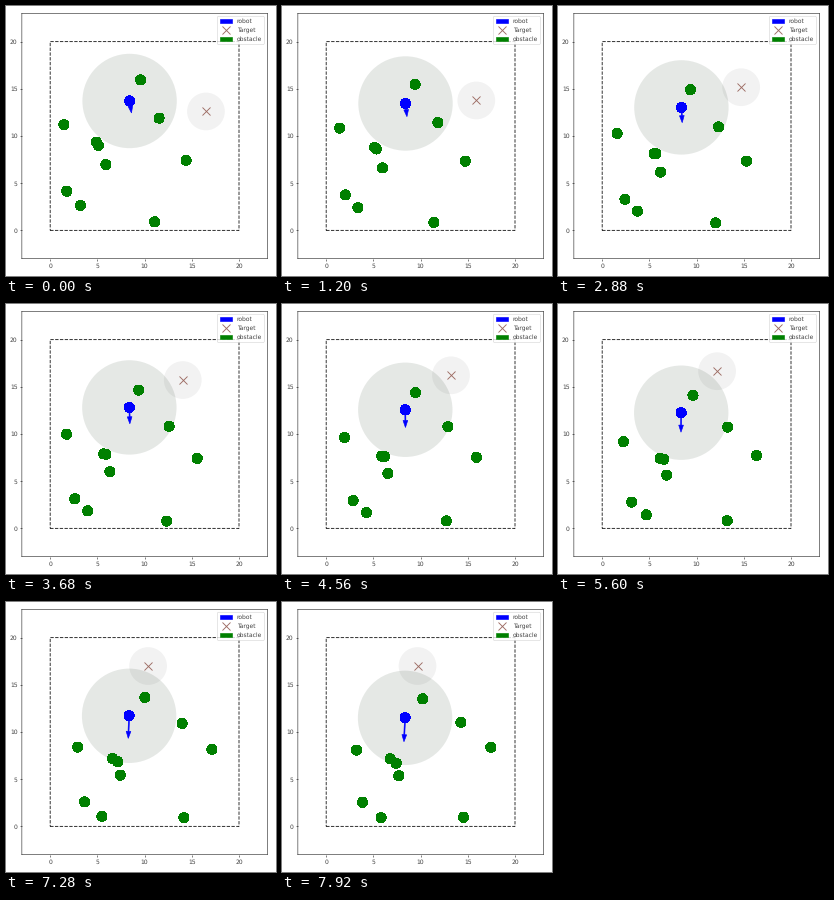
Recreate the animation shown at these times as a matplotlib script. Size 270 by 270 pixels, loop 8000 ms.

```python
import matplotlib.pyplot as plt
import numpy as np
from matplotlib.animation import FuncAnimation
from matplotlib.patches import Circle, Patch, Rectangle

# One point equals one pixel at this resolution.
SIZE, DPI = 270, 72
FRAMES, INTERVAL = 100, 80
UNIT = 9.44                 # pixels per data unit
ORIGIN = (44.2, 224.4)      # pixel position of data (0, 0)
LOW, HIGH = -3, 23
INK = "#404040"

plt.rcParams.update({
    "font.family": "DejaVu Sans", "font.size": 6, "text.hinting": "none",
    "text.color": INK, "xtick.labelcolor": INK, "ytick.labelcolor": INK,
    "axes.linewidth": 0.5, "patch.linewidth": 0.6,
    "xtick.major.width": 0.5, "ytick.major.width": 0.5,
    "xtick.major.size": 2.1, "ytick.major.size": 2.1,
    "xtick.major.pad": 2.1, "ytick.major.pad": 2.1,
})

# Each obstacle drifts along a parabola: start, halfway and end points.
DRIFTS = [
    [(9.57, 15.95), (9.4, 14.55), (10.25, 13.5)],
    [(11.53, 11.9), (12.7, 10.8), (14.3, 11.05)],
    [(1.45, 11.2), (1.8, 9.85), (3.25, 8.05)],
    [(4.9, 9.35), (5.75, 7.8), (6.8, 7.15)],
    [(5.1, 9.0), (6.0, 7.78), (7.45, 6.67)],
    [(5.9, 6.98), (6.4, 5.93), (7.73, 5.35)],
    [(14.4, 7.42), (15.7, 7.45), (17.48, 8.41)],
    [(1.75, 4.15), (2.7, 3.06), (3.87, 2.55)],
    [(3.2, 2.65), (4.07, 1.8), (5.86, 0.9)],
    [(11.06, 0.92), (12.48, 0.78), (14.6, 0.97)],
]


def drift(points, u):
    """Parabola through three points at u = 0, 0.5 and 1."""
    weights = [2 * (u - 0.5) * (u - 1), 4 * u * (1 - u), 2 * u * (u - 0.5)]
    return np.dot(weights, points)


def target_position(t):
    """Steady circling around the middle of the arena."""
    angle = np.radians(21.8 + 8.95 * t)
    return 10 + 7 * np.cos(angle), 10 + 7 * np.sin(angle)


def robot_state(t):
    """Position and arrow vector of the accelerating robot."""
    position = 8.41 - 0.007 * t, 13.71 - 0.212 * t - 0.0085 * t**2
    arrow_vector = 0.2 - 0.04 * t, -(1.27 + 0.1 * t + 0.0075 * t**2)
    return position, arrow_vector


fig = plt.figure(figsize=(SIZE / DPI, SIZE / DPI), dpi=DPI, facecolor="white")
side = (HIGH - LOW) * UNIT / SIZE
ax = fig.add_axes([(ORIGIN[0] + LOW * UNIT) / SIZE,
                   1 - (ORIGIN[1] - LOW * UNIT) / SIZE, side, side])
ax.set(xlim=(LOW, HIGH), ylim=(LOW, HIGH),
       xticks=range(0, 21, 5), yticks=range(0, 21, 5))
for spine in ax.spines.values():
    spine.set_snap(False)


def add_circle(radius, **style):
    return ax.add_patch(Circle((0, 0), radius, **style))


ax.add_patch(Rectangle((0, 0), 20, 20, fill=False, ec="#202020", lw=0.9,
                       ls="--", snap=False))
sensing = add_circle(5, fc=(0.02, 0.14, 0.02), alpha=0.1, lw=0, zorder=1)
target_area = add_circle(2, fc="black", alpha=0.05, lw=0, zorder=1.1)
obstacles = [add_circle(0.5, color="green", aa=False, zorder=2)
             for _ in DRIFTS]
robot = add_circle(0.5, color="blue", aa=False, zorder=3)
arrow = ax.arrow(0, 0, 0, -1, width=0.1, head_width=0.5, head_length=0.75,
                 length_includes_head=True, color="blue", zorder=3)
cross, = ax.plot([], [], "x", color="#9c6a62", ms=8, mew=0.9, zorder=4,
                 label="Target")
legend = ax.legend(handles=[Patch(color="blue", label="robot"), cross,
                            Patch(color="green", label="obstacle")],
                   loc="upper right")
legend.set_zorder(6)
legend.get_frame().set_snap(False)


def update(frame):
    t = frame * INTERVAL / 1000
    (x, y), (dx, dy) = robot_state(t)
    robot.center = sensing.center = (x, y)
    arrow.set_data(x=x, y=y, dx=dx, dy=dy)
    target_x, target_y = target_position(t)
    target_area.center = (target_x, target_y)
    cross.set_data([target_x], [target_y])
    for patch, points in zip(obstacles, DRIFTS):
        patch.center = drift(points, frame / FRAMES)
    return [sensing, target_area, *obstacles, robot, arrow, cross]


anim = FuncAnimation(fig, update, frames=FRAMES, interval=INTERVAL,
                     init_func=lambda: update(0), repeat=True, repeat_delay=0)
plt.show()
```
